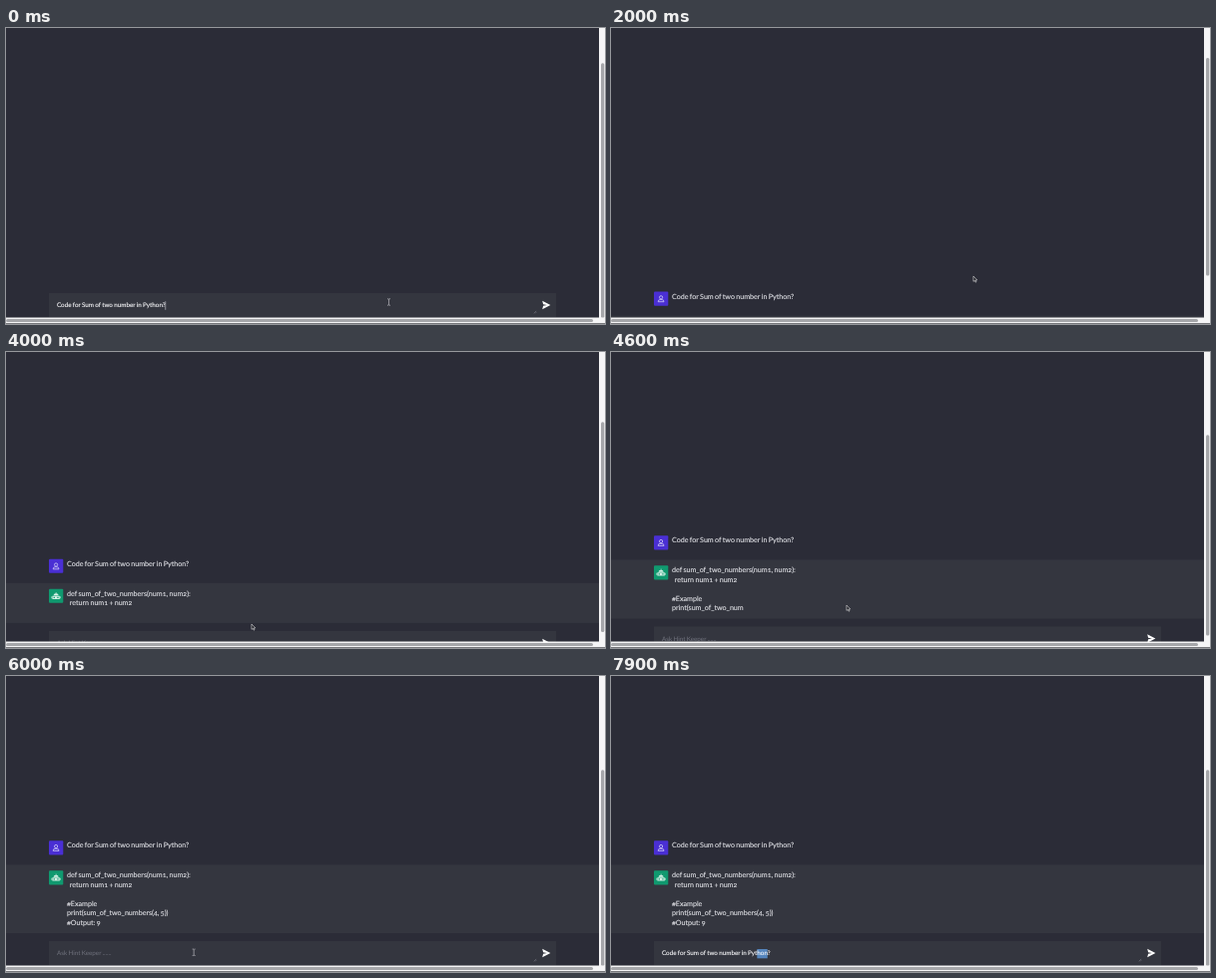
An HTML page that plays this animation: 600x297 px, repeating every 8 s.

```html
<!DOCTYPE html>
<html lang="en">
<head>
<meta charset="utf-8">
<title>Chat answer</title>
<style>
  html, body { margin: 0; width: 100%; height: 100%; overflow: hidden; background: #2b2c37; }
  svg { display: block; }
  text { font: 7.13px Lato, "Open Sans", sans-serif; font-variant-numeric: oldstyle-nums; word-spacing: -.45px;
         text-rendering: geometricPrecision; white-space: pre; fill: #e0e1e6; stroke: #e0e1e6; stroke-width: .12px; }
  #field text { font-size: 6.28px; word-spacing: -.25px; fill: #fafafc; stroke: #fafafc; }
  #field #hint { fill: #70727d; stroke: none; }
</style>
</head>
<body>
<svg width="600" height="297" viewBox="0 0 600 297">
  <rect width="600" height="297" fill="#2b2c37"/>
  <g id="chat">
    <rect id="block" y="288.7" width="595" fill="#34363f"/>
    <g transform="translate(43 264.5)">
      <rect width="14.3" height="14.2" rx="1" fill="#4a2fd4"/>
      <g id="person" fill="none" stroke="#d9d4f8" stroke-width=".75">
        <circle cx="7.1" cy="5.8" r="1.6"/>
        <path d="M4.2 10.2q0-2.1 1.9-2.1h2q1.9 0 1.9 2.1z"/>
      </g>
    </g>
    <text x="61" y="271.8">Code for Sum of two number in Python?</text>
    <g transform="translate(43 294.5)">
      <rect width="14.3" height="14.2" rx="1" fill="#10996f"/>
      <path d="M6.8 3.4h.6v1.2q2.1.2 2.3 2h-5.2q.2-1.8 2.3-2zM3.4 7h7.4v3.4h-7.4zM2.5 7.6h.6v2h-.6zM11.1 7.6h.6v2h-.6z" fill="#d3efe5"/>
      <path d="M4.6 8h1.3v1.3h-1.3zM8.3 8h1.3v1.3h-1.3z" fill="#10996f"/>
    </g>
    <g id="answer"></g>
  </g>
  <g id="field">
    <rect x="43" width="508" height="24.3" fill="#34363f"/>
    <rect id="mark" y="8" height="9.3" fill="#5585bd"/>
    <text id="hint" x="51" y="14.3">Ask Hint Keeper ......</text>
    <text id="entry" x="51" y="14.3">Code for Sum of two number in Python?</text>
    <rect id="caret" y="8.2" width=".6" height="8.6" fill="#d0d0d8"/>
    <path d="M528.8 20.3l2.4-2.4M530.2 20.3l1-1" stroke="#8a8b94" stroke-width=".5"/>
    <path d="M537.2 7.8L545.4 12l-8.2 4.2.9-3.4 3.8-.8-3.8-.8z" fill="#fff"/>
  </g>
  <path id="arrow" d="M0 0v5.4l1.3-1.1.9 1.9.8-.4-.9-1.8h1.7z" fill="#202128" stroke="#eee" stroke-width=".55"/>
  <path id="beam" d="M-1.5-3.2h1.1l.4.4.4-.4h1.1M0-2.8v5.6M-1.5 3.2h1.1l.4-.4.4.4h1.1" fill="none" stroke="#cfcfd4" stroke-width=".6"/>
  <!-- scrollbars -->
  <rect x="594" width="6" height="297" fill="#f5f5f6"/>
  <rect id="thumb" x="596" width="3.3" rx="1.5" fill="#a5a6a9"/>
  <rect y="290.5" width="600" height="6.5" fill="#f5f5f6"/>
  <rect y="292" width="588" height="3" rx="1.5" fill="#a5a6a9"/>
  <rect y="296" width="600" height="1" fill="#77787c"/>
</svg>
<script>
const $ = id => document.getElementById(id);
const set = (id, attrs) => { for (const k in attrs) $(id).setAttribute(k, attrs[k]); };
const show = (id, on) => set(id, { visibility: on ? 'visible' : 'hidden' });
const move = (id, x, y) => set(id, { transform: `translate(${x} ${y})` });
const clamp = v => Math.min(1, Math.max(0, v));
const easeOut = v => 1 - (1 - clamp(v)) ** 2;

const LOOP = 8000, SENT = 700, REPLY = 2850, FOCUS = 6300, PASTED = 6700, SELECT = 7700;
const VIEW = 291, LINE = 9.5, FIELD_TOP = 266, BLOCK_TOP = 288.7, ABOVE = 40;
const CODE = `def sum_of_two_numbers(num1, num2):
  return num1 + num2

#Example
print(sum_of_two_numbers(4, 5))
#Output: 9`;

// pointer stops: time, x, y
const STOPS = [[1900, 383.5, 275], [2000, 363, 249], [2600, 348, 223], [4000, 246, 273],
  [4600, 236, 254], [5200, 201, 276], [7100, 170.5, 279]];

const rows = CODE.split('\n').map((_, i) => {
  const row = document.createElementNS('http://www.w3.org/2000/svg', 'text');
  row.setAttribute('x', 61);
  row.setAttribute('y', 301.8 + i * LINE);
  return $('answer').appendChild(row);
});

const blockHeight = lines => Math.max(26, 11.6 + LINE * lines);
const growth = lines => BLOCK_TOP + blockHeight(lines) + 8 - FIELD_TOP;

function pointer(t) {
  let [, x, y] = STOPS[0];
  STOPS.slice(1).forEach(([end, nx, ny], i) => {
    const start = STOPS[i][0], f = clamp((t - start) / (end - start));
    x += (nx - x) * f;
    y += (ny - y) * f;
  });
  return [x, y];
}

// each wheel turn eases to the bottom of a reply with that many lines
function scrolled(t) {
  let y = 0;
  for (const [start, lines] of [[2050, 1], [4000, 4], [5000, 6]])
    y += (growth(lines) - y) * easeOut((t - start) / 350);
  return y;
}

function reply(t) {
  if (t >= REPLY) return CODE.slice(0, Math.floor((t - REPLY) / 20));
  return '.'.repeat(Math.max(0, Math.floor((t - 760) / 300)) % 4);
}

function caretOn(t) {
  if (t < SENT) return t < 400;
  if (t < FOCUS || t >= SELECT) return false;
  return (t - (t < PASTED ? FOCUS : PASTED)) % 1000 < 500;
}

function draw(t) {
  const sent = t >= SENT, filled = !sent || t >= PASTED;
  const lines = reply(t).split('\n');
  const scroll = scrolled(t), [mx, my] = pointer(t);
  const extra = sent ? growth(lines.length) : 0;
  const fieldTop = FIELD_TOP + extra - scroll;

  set('chat', { display: sent ? 'inline' : 'none' });
  move('chat', 0, -scroll);
  set('block', { height: blockHeight(lines.length) });
  show('person', t >= 1000);
  rows.forEach((row, i) => row.textContent = lines[i] || '');

  move('field', 0, fieldTop);
  show('hint', !filled);
  show('entry', filled);
  show('caret', caretOn(t));
  set('caret', { x: 51 + (filled ? $('entry').getComputedTextLength() : 0) });

  // selection runs backwards from the question mark
  const charX = i => $('entry').getStartPositionOfChar(i).x;
  const from = 36 - Math.floor(3 * clamp((t - SELECT) / 200));
  set('mark', { x: charX(from), width: charX(36) - charX(from) });

  const overField = my >= fieldTop;
  show('beam', overField && t < SELECT);
  show('arrow', !overField);
  move(overField ? 'beam' : 'arrow', mx, my);

  const page = VIEW + ABOVE + extra;
  set('thumb', { y: VIEW * (ABOVE + scroll) / page, height: VIEW * VIEW / page });
}

const start = performance.now();
function tick() {
  draw((performance.now() - start) % LOOP);
  requestAnimationFrame(tick);
}
tick();
</script>
</body>
</html>
```
